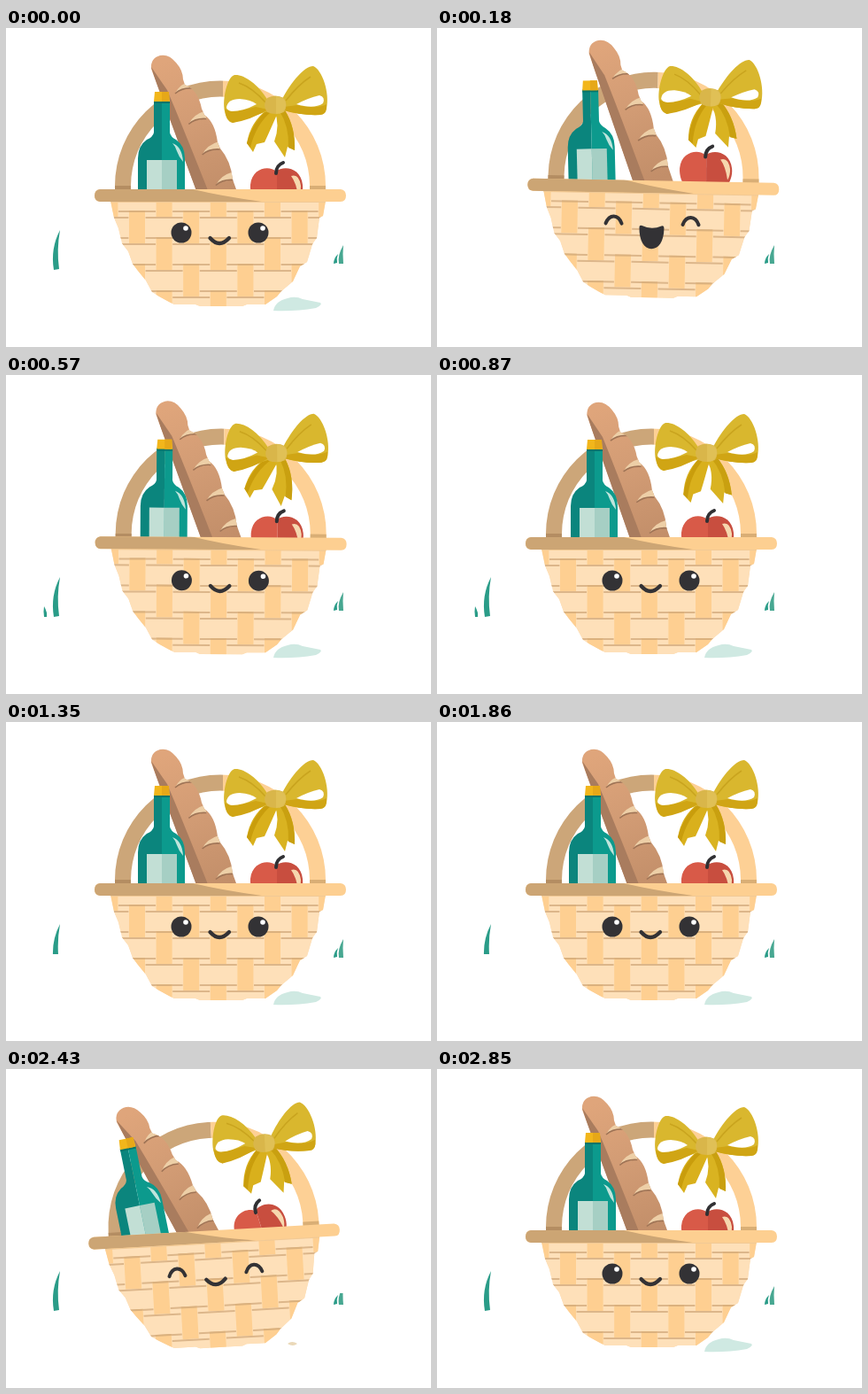
These frames come from a looping animation (480 by 360 pixels, 3 s). An HTML page with a canvas:

```html
<!DOCTYPE html>
<html lang="en">
<head>
<meta charset="utf-8">
<title>Picnic basket</title>
<style>
html, body { margin: 0; width: 100%; height: 100%; overflow: hidden; background: #fff; }
canvas { display: block; width: 480px; height: 360px; }
</style>
</head>
<body>
<canvas id="stage" width="480" height="360"></canvas>
<script>
const ctx = document.getElementById('stage').getContext('2d');
const LOOP = 3000, STEP = 30, RAD = Math.PI / 180;

// Poses: tilt and lift of the basket, then offsets of its contents.
const base = { tilt: 0, lift: 0, botX: 0, botY: 0, botR: 0, brX: 0, brY: 0, brR: 0,
  apX: 0, apY: 0, apR: 0, bowR: 0, tailR: 0 };
const pose = changes => ({ ...base, ...changes });
const rest = pose({});
const jump = pose({ tilt: 2.6, lift: -23.5, botX: -7, botY: -4, botR: -6, brX: 5, brY: -14, brR: 0.5,
  apX: -11, apY: -24, apR: -2, bowR: 2, tailR: -28 });
const land = pose({ tilt: 0.3, lift: 1, botX: 2, brX: 4, brY: -2, bowR: -1, tailR: 6 });
const settle = pose({ lift: 1, botX: 2, brX: 3, brR: 1, tailR: -8 });
const right = pose({ tilt: 2.6, botX: 3, botR: 2, brX: 3, brR: 1, apX: 4, apR: 6, bowR: 1, tailR: 5 });
const left = pose({ tilt: -3.2, botX: -11, botR: -8.4, brX: -13, brY: 1, brR: -5,
  apX: -10, apR: -14, bowR: 0, tailR: -8 });
const keys = [[0, rest], [60, rest], [330, jump], [570, land], [870, settle], [1080, rest],
  [1950, rest], [2160, right], [2430, left], [2640, right], [2790, rest], [LOOP, rest]];

function poseAt(t) {
  let i = 1;
  while (keys[i][0] < t) i++;
  const [t0, a] = keys[i - 1], [t1, b] = keys[i];
  const k = (1 - Math.cos(Math.PI * (t - t0) / (t1 - t0))) / 2;
  const out = {};
  for (const name in base) out[name] = a[name] + (b[name] - a[name]) * k;
  return out;
}

const between = (t, a, b) => t >= a && t < b;

function fill(d, color) {
  ctx.fillStyle = color;
  ctx.fill(new Path2D(d));
}

function line(d, color, width) {
  ctx.strokeStyle = color;
  ctx.lineWidth = width;
  ctx.stroke(new Path2D(d));
}

function rect(x, y, w, h, color) {
  ctx.fillStyle = color;
  ctx.fillRect(x, y, w, h);
}

function disc(x, y, r, color) {
  ctx.fillStyle = color;
  ctx.beginPath();
  ctx.arc(x, y, r, 0, 7);
  ctx.fill();
}

function group(draw, px = 0, py = 0, angle = 0, dx = 0, dy = 0) {
  ctx.save();
  ctx.translate(px + dx, py + dy);
  ctx.rotate(angle * RAD);
  ctx.translate(-px, -py);
  draw();
  ctx.restore();
}

function clipTo(d, draw) {
  ctx.save();
  ctx.clip(new Path2D(d));
  draw();
  ctx.restore();
}

function ground(t) {
  const air = between(t, 90, 560), sway = between(t, 2130, 2700);
  if (sway) fill('M318 310 Q323 306 329 310 Q324 314 318 310', '#ead8b8');
  else if (!air) fill('M302 319 Q304 308 318 305 Q327 302 335 306 L355 310 Q358 312 350 316 Q327 320 302 319Z', '#cfe9e2');

  if (!between(t, 150, 560)) {
    clipTo(between(t, 1110, 2040) ? 'M0 0H100V262H0Z' : 'M0 0H100V360H0Z', () =>
      fill('M61 228 Q50 249 54 273 L60 272 Q57 250 61 228Z', '#2a9c88'));
  }
  if (between(t, 570, 1110) || between(t, 2040, 2280)) fill('M43 261 Q42 267 43 273 L46 273 Q47 268 43 261Z', '#2a9c88');
  clipTo(sway ? 'M360 253H400V280H360Z' : 'M360 230H400V280H360Z', () => {
    fill('M381 245 Q374 257 376 266 L381 266 Q380 255 381 245Z', '#47a791');
    fill('M375 255 Q370 260 370 266 L374 265 Q373 260 375 255Z', '#2a9c88');
  });
}

function handle() {
  const arch = 'M123 184 V178 A119 118.5 0 0 1 361 178 V184 H343 V178 A101 100.5 0 0 0 141 178 V184Z';
  clipTo(arch, () => {
    rect(120, 50, 125, 140, '#cca679');
    rect(245, 50, 120, 140, '#fdd095');
    rect(120, 178, 30, 8, '#b48d62');
    rect(340, 178, 30, 8, '#d9ae75');
  });
}

function bread() {
  const loaf = 'M164 46 Q163 34 174 31 Q184 29 192 39 Q200 48 200 58 L202 64 Q217 70 221 91 L224 98 Q236 106 239 129 L242 136 Q254 150 256 171 L268 204 L224 208 Z';
  clipTo(loaf, () => {
    const g = ctx.createLinearGradient(175, 40, 235, 190);
    g.addColorStop(0, '#dfa57b');
    g.addColorStop(0.5, '#d19b74');
    g.addColorStop(1, '#c28e69');
    ctx.fillStyle = g;
    ctx.fillRect(150, 20, 130, 190);
    fill('M164 44 L182 70 Q200 112 237 206 L215 210Z', '#a97c5e');
    for (let i = 0; i < 4; i++) {
      group(() => {
        fill('M0 2 Q5 -9 19 -13 L20 -4 Q8 -4 0 2Z', '#edcfa7');
        line('M0 2 Q8 -5 20 -4', '#9f7355', 1.6);
      }, 0, 0, 0, 191 + 15.3 * i, 72 + 34.5 * i);
    }
  });
}

function bottle() {
  const glass = 'M167 82 H185 V118 Q186 123 192 126 Q202 133 202 147 V200 H149 V147 Q149 133 159 126 Q166 123 167 118Z';
  clipTo(glass, () => {
    rect(145, 80, 31, 125, '#0b857d');
    rect(176, 80, 30, 125, '#0c9a8d');
    rect(159, 149, 17, 52, '#c2dfd5');
    rect(176, 149, 17, 52, '#a6cfc4');
    fill('M188 130 Q199 134 200 151 Q195 145 193 139 Q191 133 188 130Z', '#bfe5dc');
    rect(167, 82, 18, 3, '#077469');
  });
  fill('M168 72 H184 L185 83 H167Z', '#f2b61b');
  rect(176, 72, 8, 11, '#e6a818');
}

function apple() {
  const skin = 'M305 162 C313 155 333 157 335 177 C337 194 322 208 312 207 Q305 204 298 207 C288 208 275 194 276 177 C278 157 298 155 305 162Z';
  clipTo(skin, () => {
    rect(270, 150, 36, 60, '#d85a48');
    rect(306, 150, 36, 60, '#c84e3f');
    fill('M322 167 Q331 164 333 178 Q333 186 330 190 Q328 175 322 167Z', '#f6d7ae');
  });
  ctx.lineCap = 'round';
  line('M305 164 Q305 155 313 152', '#303033', 4);
}

function bow(tailR) {
  group(() => {
    fill('M-9 5 Q-28 19 -32 43 L-25 53 L-21 44 L-12 42 Q-5 27 4 6Z', '#d9b01c');
    fill('M-9 5 Q-26 20 -32 43 L-28 48 Q-22 22 -4 7Z', '#c99d0c');
    fill('M-1 6 Q6 22 -1 41 L11 59 L14 47 L22 51 Q23 25 11 6Z', '#d9b321');
    fill('M5 7 Q16 24 15 48 L22 51 Q23 25 11 6Z', '#c9a010');
  }, 0, 0, tailR);
  fill('M-8 -5 C-20 -25 -36 -35 -46 -34 C-54 -32 -60 -7 -57 7 Q-55 19 -48 20 Q-25 12 -8 7Z', '#d9b72e');
  fill('M-57 4 Q-50 10 -22 2 L-8 5 Q-28 17 -48 20 Q-56 18 -57 4Z', '#d0a514');
  fill('M-55 3 Q-54 -7 -40 -7 Q-27 -6 -21 -1 Q-36 7 -49 7 Q-54 6 -55 3Z', '#fff');
  fill('M8 -7 C18 -26 33 -44 43 -44 C53 -40 62 -14 58 4 Q57 11 51 11 Q30 12 10 6Z', '#d9b72e');
  fill('M10 2 L25 0 Q47 5 58 -1 Q59 10 51 11 Q29 12 10 6Z', '#d0a514');
  fill('M24 -1 Q37 -8 50 -11 Q57 -9 54 -2 Q44 5 24 -1Z', '#fff');
  line('M-11 -3 Q-26 -20 -41 -25 M12 -5 Q26 -23 40 -32', '#c9a41e', 1.5);
  fill('M-9 -8 Q0 -13 10 -8 Q15 0 10 8 Q0 12 -9 8 Q-15 0 -9 -8Z', '#d9b64a');
  fill('M1 -10 Q13 -9 12 1 Q11 10 1 10Z', '#e0c056');
}

function weave() {
  const bowl = 'M118 195 H361 L358 212 L354 214 L351 237 L346 244 L340 264 L332 269 L324 286 L311 297 L306 303 L293 312 H272 L267 314 H219 L214 312 H190 L184 309 L173 303 L165 298 L158 285 L149 274 L143 266 L138 252 L131 243 L127 226 L122 214Z';
  clipTo(bowl, () => {
    rect(110, 190, 260, 130, '#fee0b9');
    for (let row = 0; row < 5; row++) {
      const y = 225 + 30 * (row - 1);
      for (let col = -1; col < 9; col++) {
        const x = 148 + 30.6 * col;
        if ((row + col) % 2) {
          rect(x - 9, y - 18, 18, 36, '#fecf91');
          rect(x - 9, y - 19, 18, 2, '#dbb17d');
        } else {
          rect(x - 21, y - 12, 42, 24, '#fee0b9');
          rect(x - 21, y - 12, 42, 2, '#dcb68a');
          rect(x - 21, y + 11, 42, 2, '#dcb68a');
        }
      }
    }
    rect(110, 195, 260, 2, '#f1c995');
  });
}

function rim() {
  clipTo('M106 182 H378 Q384 183 384 189 Q384 196 378 196 H106 Q100 195 100 189 Q100 183 106 182Z', () => {
    rect(98, 180, 290, 20, '#fdcf91');
    fill('M98 180 H203 Q238 189 289 196 H98Z', '#cca574');
  });
}

function face(t) {
  const laugh = between(t, 120, 570), shut = laugh || between(t, 2070, 2640);
  const ink = '#333235';
  ctx.lineCap = 'round';
  for (const x of [198, 285]) {
    if (shut) {
      line(`M${x - 9} 231 Q${x - 6} 223 ${x} 223 Q${x + 6} 223 ${x + 9} 231`, ink, 4);
    } else {
      disc(x, 231, 11.5, ink);
      disc(x + 5, 226, 2.8, '#fff');
    }
  }
  if (laugh) fill('M227 235 Q227 232 230 233 Q241 238 252 233 Q255 232 255 236 C255 251 249 259 241 259 C233 259 227 250 227 235Z', ink);
  else line('M230.5 237 Q241 249 252 237', ink, 4.3);
}

function draw(t) {
  const p = poseAt(t);
  ctx.fillStyle = '#fff';
  ctx.fillRect(0, 0, 480, 360);
  ground(t);
  group(() => {
    handle();
    group(bread, 237, 183, p.brR, p.brX, p.brY);
    group(bottle, 175, 183, p.botR, p.botX, p.botY);
    group(apple, 305, 183, p.apR, p.apX, p.apY);
    group(() => bow(p.tailR), 0, 0, p.bowR, 304, 87);
    weave();
    rim();
    face(t);
  }, 242, 313, p.tilt, 0, p.lift);
}

function tick() {
  const t = performance.now() % LOOP;
  draw(Math.min(Math.floor(t / STEP) * STEP, 2850));
  requestAnimationFrame(tick);
}
tick();
</script>
</body>
</html>
```
